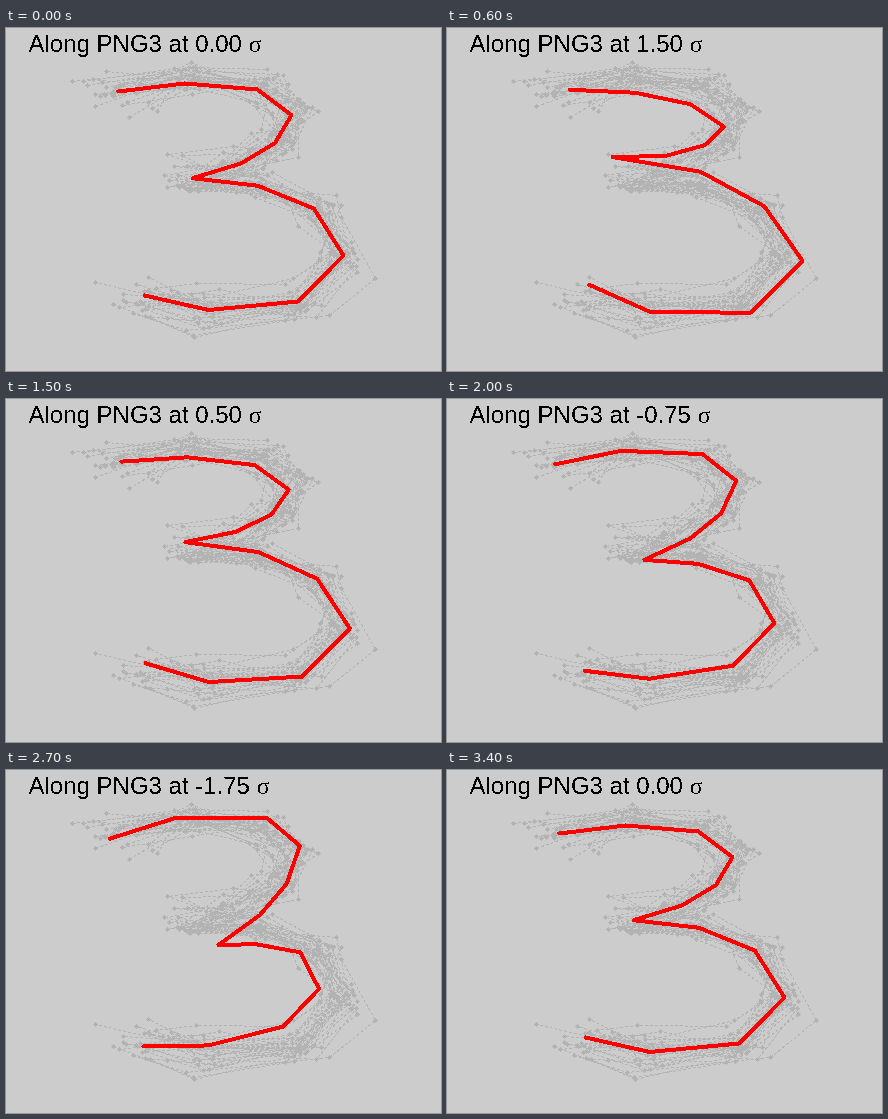
An HTML page that plays this animation: 435x343 px, repeating every 3500 ms.

```html
<!DOCTYPE html>
<html lang="en">
<head>
<meta charset="utf-8">
<title>Shape variation along PNG3</title>
<style>
  html, body { margin: 0; width: 100%; height: 100%; overflow: hidden; background: #ccc; }
  svg { display: block; }
  path { shape-rendering: crispEdges; }
  .sample { fill: none; stroke: #b3b3b3; stroke-width: 1; stroke-dasharray: 3 2; }
  .marks { fill: #b3b3b3; }
  .mode { fill: none; stroke: #f00; stroke-width: 4; stroke-linecap: round; stroke-linejoin: round; }
  text { font: 24px "Liberation Sans", Arial, sans-serif; fill: #000; }
  .sigma { font-family: "Liberation Serif", "Times New Roman", serif; }
</style>
</head>
<body>
<svg width="435" height="343" viewBox="0 0 435 343">
  <!-- Hard text edges, without smoothing -->
  <filter id="hard"><feComponentTransfer><feFuncA type="discrete" tableValues="0 1"/></feComponentTransfer></filter>
  <g transform="translate(.5 .5)">
    <g id="samples"></g>
    <path id="mode" class="mode"/>
  </g>
  <text x="22.5" y="24" filter="url(#hard)"><tspan id="label"></tspan> <tspan class="sigma">σ</tspan></text>
</svg>
<script>
const byId = id => document.getElementById(id);

// Key points of the digit: mean x, mean y, direction x, direction y (per sigma).
const landmarks = [
  [111.7, 63, 6, -2], [178, 55, 6, 5.3], [251, 61, -5.3, 9],
  [285, 86.5, -5.3, 7.2], [268.5, 114.5, -7, 1], [234.5, 135, -10.8, -5.3],
  [186, 149.7, -14.4, -14.2], [251.5, 157.3, 1.2, -9.4], [307.3, 180, 7, -1.3],
  [337, 227, 13, 4.2], [291.7, 273, 8.2, 8.5], [202, 281.5, 0.4, 2.5],
  [138, 267, 1.7, -6.2]
];
const center = [234, 157.7];
const anglePerSigma = 0.108;

// The mode is a great circle through the mean shape.
function shapeAt(sigma) {
  const angle = anglePerSigma * sigma;
  const c = Math.cos(angle), s = Math.sin(angle) / anglePerSigma;
  return landmarks.map(([x, y, dx, dy]) => [
    center[0] + (x - center[0]) * c + dx * s,
    center[1] + (y - center[1]) * c + dy * s
  ]);
}

const toPath = points => "M" + points.map(p => p.map(v => v.toFixed(2)).join(" ")).join("L");

let seed = 29;
function random() {
  seed = (seed * 16807) % 2147483647;
  return seed / 2147483647;
}
const gauss = () => Math.sqrt(-2 * Math.log(random())) * Math.cos(2 * Math.PI * random());

// Stroke ends and the inner tip wander most.
function sampleShape() {
  const scale = 1 + gauss() * 0.05;
  return shapeAt(gauss() * 0.7).map(([x, y], i) => {
    const reach = i % 6 ? 11 : 19;
    return [
      Math.round(center[0] + (x - center[0]) * scale + gauss() * reach),
      Math.round(center[1] + (y - center[1]) * scale + gauss() * 8)
    ];
  });
}

let samples = "";
for (let i = 0; i < 30; i++) {
  const points = sampleShape();
  const marks = points.map(([x, y]) => `M${x - 2.5} ${y}l2.5 -2.5l2.5 2.5l-2.5 2.5z`).join("");
  samples += `<path class="sample" d="${toPath(points)}"/><path class="marks" d="${marks}"/>`;
}
byId("samples").innerHTML = samples;

const clamp = (v, max) => Math.max(0, Math.min(v, max));
const stepMs = 100, loopMs = 3500;

// Up to 2 sigma, down to -2 and back, resting one step at each end.
function sigmaAt(step) {
  return (clamp(step, 8) - clamp(step - 9, 16) + clamp(step - 26, 8)) / 4;
}

let shown = -1;
const start = performance.now();
function draw() {
  const step = Math.floor(((performance.now() - start) % loopMs) / stepMs);
  if (step !== shown) {
    shown = step;
    const sigma = sigmaAt(step);
    byId("label").textContent = `Along PNG3 at ${sigma.toFixed(2)}`;
    byId("mode").setAttribute("d", toPath(shapeAt(sigma)));
  }
  requestAnimationFrame(draw);
}
draw();
</script>
</body>
</html>
```
